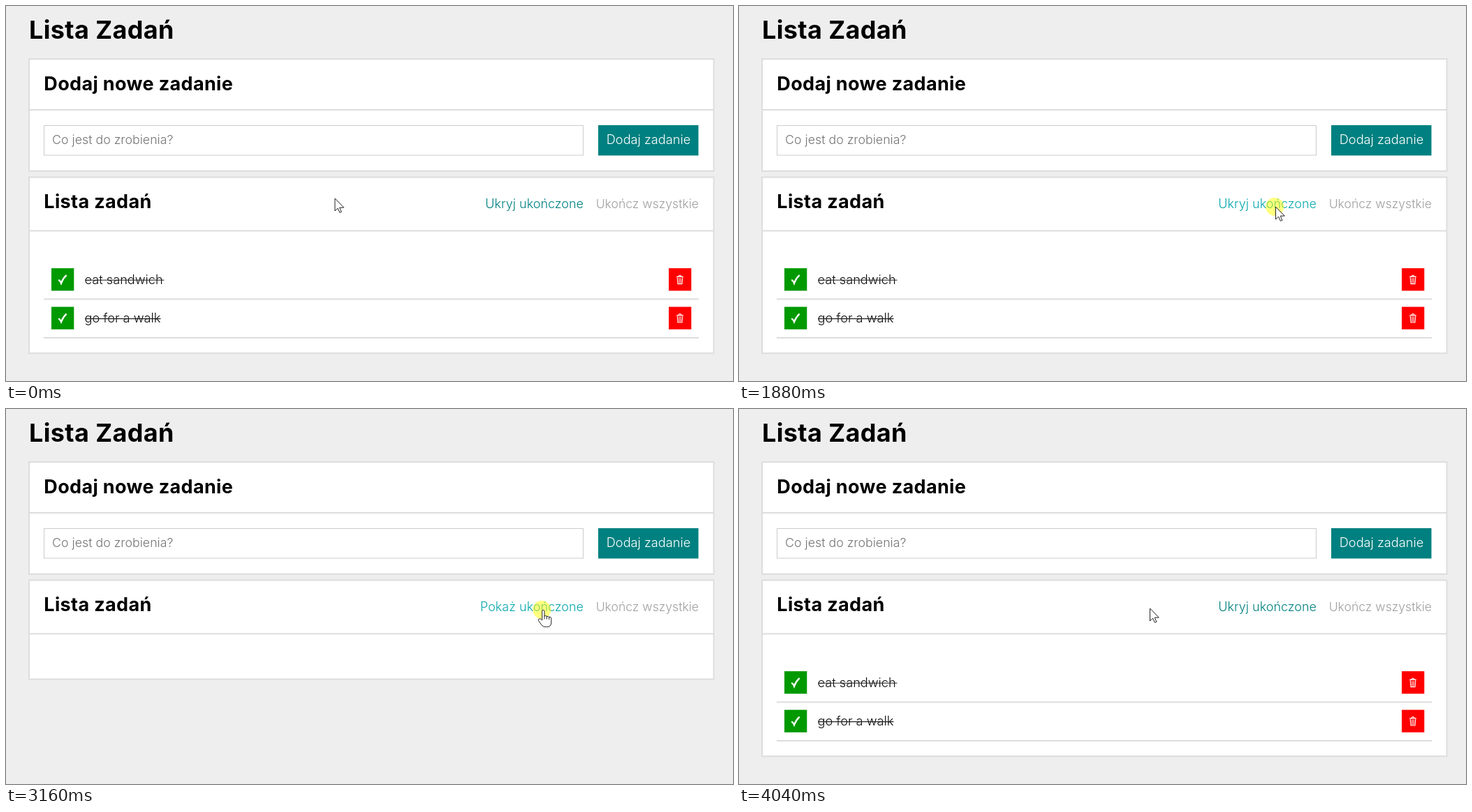
Recreate the animation shown at these times as an HTML page. Size 1041 px wide and 538 px high, loop 4.57 s.

```html
<!DOCTYPE html>
<html lang="pl">
<head>
<meta charset="utf-8">
<title>Lista zadań</title>
<style>
  html, body { margin: 0; width: 100%; height: 100%; overflow: hidden; background: #eee; }
  svg { display: block; width: 1041px; height: 538px; }
  text { font: 350 17.8px Inter, sans-serif; font-optical-sizing: none; }
  .title { font-size: 36px; font-weight: 700; letter-spacing: .01em; }
  .heading { font-size: 27px; font-weight: 700; letter-spacing: .013em; }
  .panel { fill: #fff; stroke: #ddd; stroke-width: 2; }
  .rule { stroke: #ddd; stroke-width: 2; }
  .task { font-size: 18.2px; font-weight: 300; fill: #111; }
  .right { text-anchor: end; }
  .cursor { fill: #fff; stroke: #222; stroke-width: 1; stroke-linejoin: round; stroke-linecap: round; }
</style>
</head>
<body>
<svg viewBox="0 0 1041 538">
  <defs>
    <g id="row">
      <rect x="65" width="32.3" height="32.3" fill="#090"/>
      <path d="M75 17.2 Q77.4 17.2 79 21.6 Q81.6 14.5 86.6 10" fill="none" stroke="#fff" stroke-width="2.3"/>
      <rect x="949" width="32.3" height="32.3" fill="#f00"/>
      <g fill="none" stroke="#fff">
        <path d="M960.2 12.2 H969.8 M963 11.6 Q965 8.6 967 11.6" stroke-width="1.3"/>
        <path d="M961.2 13 L962 22.4 H968 L968.8 13" stroke-width="1.1"/>
        <path d="M963.6 14 V21.5 M965 14 V21.5 M966.4 14 V21.5" stroke-width=".7"/>
      </g>
      <path class="rule" d="M54 44.4 H992"/>
    </g>
  </defs>

  <text class="title" x="33" y="46.5">Lista Zadań</text>

  <rect class="panel" x="33" y="76" width="980.5" height="160.8"/>
  <path class="rule" d="M33 149 H1013"/>
  <text class="heading" x="54.3" y="121">Dodaj nowe zadanie</text>
  <rect x="54.5" y="171.5" width="772" height="42.5" fill="#fff" stroke="#ccc"/>
  <text x="66" y="198" fill="#757575">Co jest do zrobienia?</text>
  <rect x="848" y="171" width="143.5" height="43.5" fill="teal"/>
  <text x="920" y="198" fill="#fff" text-anchor="middle" style="font-size:18.2px">Dodaj zadanie</text>

  <rect class="panel" id="list" x="33" y="245.6" width="980.5" height="252.6"/>
  <path class="rule" d="M33 322.6 H1013"/>
  <text class="heading" x="54.3" y="290">Lista zadań</text>
  <text class="right" id="toggle" x="827" y="289.5" style="font-size:18px"></text>
  <text class="right" x="992" y="289.5" fill="#a0a0a0" style="font-size:17.6px">Ukończ wszystkie</text>

  <g id="tasks">
    <use href="#row" y="376.2"/>
    <text class="task" x="112.5" y="398.6">eat sandwich</text>
    <path d="M113 393.2 H226.5" stroke="#222" stroke-width="1.1"/>
    <use href="#row" y="431.6"/>
    <text class="task" x="112.5" y="454">go for a walk</text>
    <path d="M113 448.6 H221.5" stroke="#222" stroke-width="1.1"/>
  </g>

  <g id="pointer">
    <circle id="click" cx="-.8" r="13" fill="#ff0" fill-opacity=".5"/>
    <path class="cursor" id="arrow" d="M.5 .5 V18 L4.6 14.2 L7.4 20.4 L9.9 19.3 L7.2 13.2 H12.9 Z"/>
    <g class="cursor" id="hand">
      <path d="M-.3 14.5 V2.2 Q-.3 .5 1.3 .5 Q3 .5 3 2.2 V9 Q4.7 7.7 6.3 9.6 Q8.2 8.6 9.6 10.6 Q12.8 9.8 12.8 13.2 V18 Q12.8 24.6 6.6 24.6 H4.4 Q.8 24.6 -1.3 21.6 L-5.3 15.8 Q-6.4 13.8 -4.6 13 Q-3.2 12.4 -1.8 13.8 Z"/>
      <path fill="none" d="M3 9 V13 M6.3 9.6 V13.4 M9.6 10.6 V13.8"/>
    </g>
  </g>
</svg>
<script>
const LOOP = 4570;
const HIDE_AT = 1950, SHOW_AT = 3230;
const ENTER_AT = 670, LEAVE_AT = 3760;
const FADE = 280;
const TEAL = [0, 128, 128], BRIGHT = [8, 168, 172];

// Pointer positions: time, x, y. Each one holds until the next.
const moves = [
  [0, 470.5, 276], [130, 473, 277], [200, 475.5, 278],
  [400, 482, 279], [470, 510, 281], [540, 560, 284], [610, 630, 287],
  [670, 694, 290], [740, 752, 292], [810, 795, 293], [880, 811, 292],
  [950, 768, 288], [3700, 750, 288], [3760, 682, 287],
  [3830, 640, 287], [3900, 612, 286], [3970, 595, 286], [4040, 588, 286]
];

const fadeSteps = start => [0, 1, 2, 3, 4, 5].map(i => start + 70 * i);
const ticks = [...moves.map(m => m[0]), ...fadeSteps(1880), ...fadeSteps(3160)];

const el = id => document.getElementById(id);
const show = (id, on) => el(id).setAttribute("visibility", on ? "visible" : "hidden");
const within = (t, start, length) => t >= start && t < start + length;

function ease(t, start) {
  const p = Math.min(1, Math.max(0, (t - start) / FADE));
  return 1 - (1 - p) ** 2.2;
}

function glow(t) {
  if (t >= LEAVE_AT) return 1 - ease(t, LEAVE_AT);
  const start = t >= SHOW_AT ? SHOW_AT : t >= HIDE_AT ? HIDE_AT : ENTER_AT;
  return ease(t, start);
}

function draw(time) {
  const t = Math.max(...ticks.filter(tick => tick <= time));
  const [, x, y] = moves.filter(m => m[0] <= t).pop();
  const hidden = t >= HIDE_AT && t < SHOW_AT;
  const clickDown = within(t, 1880, 70);
  const hand = t >= ENTER_AT && t < LEAVE_AT && !clickDown;
  const mix = glow(t);
  const color = TEAL.map((c, i) => Math.round(c + (BRIGHT[i] - c) * mix));

  el("toggle").textContent = hidden ? "Pokaż ukończone" : "Ukryj ukończone";
  el("toggle").setAttribute("fill", `rgb(${color})`);
  el("list").setAttribute("height", hidden ? 142 : 252.6);
  show("tasks", !hidden);
  show("click", clickDown || within(t, 3160, 70));
  show("hand", hand);
  show("arrow", !hand);
  el("pointer").setAttribute("transform", `translate(${x} ${y})`);
}

function loop() {
  draw(performance.now() % LOOP);
  requestAnimationFrame(loop);
}
loop();
</script>
</body>
</html>
```
